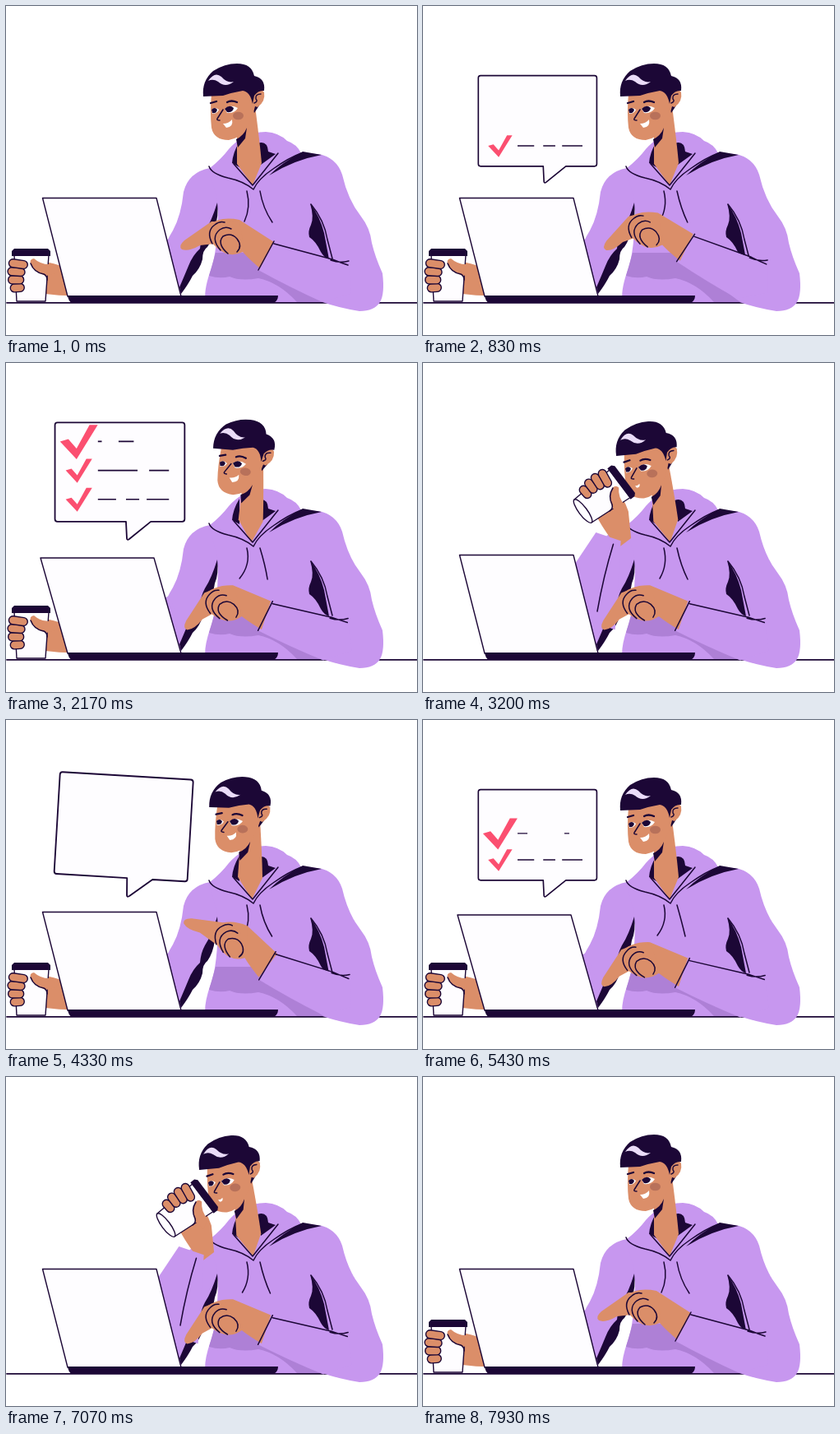
These frames come from a looping animation (500x400 px, 7.96 s). An HTML page:

```html
<!DOCTYPE html>
<html lang="en">
<head>
<meta charset="utf-8">
<title>Checklist at the laptop</title>
<style>
  html, body { margin: 0; width: 100%; height: 100%; overflow: hidden; background: #fff; }
  svg { display: block; width: 500px; height: 400px; }
  .ink { fill: #1c0736; }
  .skin { fill: #db8e69; }
  .cloth { fill: #c797ef; }
  .shade { fill: #ae80d6; }
  .paper { fill: #fefdff; stroke: #1c0736; stroke-width: 1.4; stroke-linejoin: round; }
  .line { fill: none; stroke: #1c0736; stroke-width: 1.5; stroke-linecap: round; stroke-linejoin: round; }
  .dash { fill: none; stroke: #1c0736; stroke-width: 1.6; }
  .finger { fill: #db8e69; stroke: #1c0736; stroke-width: 1.4; }
  .tick { fill: #fb4f70; }
</style>
</head>
<body>
<svg viewBox="0 0 500 400" xmlns="http://www.w3.org/2000/svg">
  <path class="line" style="stroke-width:1.8" d="M1 360.8H500"/>

  <g id="body">
    <path class="cloth" d="M264 190L248 197Q222 202 216 226Q213 255 203 273Q196 284 190 300L212 350Q240 310 258 245Z"/>
    <path class="cloth" d="M247 198Q262 186 271 174Q279 165 288 160Q301 153 316 153Q332 154 342 164Q354 168 359 179L380 180Q402 184 409 205Q416 236 432 256Q443 270 445 288Q449 305 458 325Q461 350 455 360Q448 371 430 371Q405 367 385 360H243Q240 348 248 324Q258 300 258 240Z"/>
    <path class="ink" d="M257 239Q259 256 254 268Q252 283 245 293Q239 297 239 308Q236 320 227 328Q222 338 213 350L211 342Q217 328 222 316Q227 303 236 295Q237 283 242 274Q250 262 257 239Z"/>
    <path class="ink" d="M320 206Q336 190 361 177L384 181Q350 187 320 206Z"/>
    <path class="ink" d="M370 240Q382 256 387 276L393 308Q387 306 383 299Q377 286 369 281Q367 274 371 266Q375 257 370 240Z"/>
    <path class="line" d="M371 241Q387 260 391 284L397 307"/>
    <path class="ink" d="M284 165Q276 178 275 191L284 196ZM306 167Q318 163 319 177L328 180L310 193Z"/>
  </g>

  <g id="head">
    <path class="skin" d="M281 150V192L300 218L311 191Q309 168 303 122L290 120Z"/>
    <path class="ink" d="M280 162Q289 158 293 148L291 161L282 172ZM299 121L308 121L302 130Z"/>
    <path class="skin" d="M250 106Q248 130 250 148Q253 163 271 163Q284 161 291 150Q299 140 303 122L300 98H252Z"/>
    <path class="skin" d="M300 104Q309 98 314 105Q316 116 306 123L300 121Z"/>
    <path class="ink" d="M240 110Q238 91 252 79Q266 70 281 70Q299 70 302 85Q316 88 314 103Q307 102 302 109L300 119Q297 104 288 103Q276 105 264 109Z"/>
    <path fill="#eadcf8" d="M246 91Q254 79 262 86Q269 94 277 92Q267 100 258 92Q252 88 246 91Z"/>
    <path class="line" d="M310 107Q303 107 304 113Q307 116 302 118"/>
    <path class="line" style="stroke-width:2.3" d="M249 118L256 116M269 117Q274 114 281 117"/>
    <path fill="#fff" d="M250 126Q254 122 259 126Q257 131 251 131ZM266 125Q273 119 282 124Q278 131 269 130Z"/>
    <path class="ink" d="M250 126Q254 122 257 126Q256 131 251 130ZM266 125Q272 119 277 124Q276 130 269 129Z"/>
    <path class="line" d="M264 126L257 137Q256 139 260 139"/>
    <ellipse cx="282.500" cy="133.500" rx="6.500" ry="4.800" fill="#b8715a"/>
    <path id="smile" fill="#fff" d="M-4-1Q3-1 7-6Q9 3 0 4Z"/>
  </g>

  <path class="line" d="M247 195Q250 204 270 209Q289 213 301 223Q307 210 325 198Q345 184 359 179M277 192L300 218L331 179"/>
  <path id="strings" class="line"/>

  <g id="cupArm">
    <path class="skin" d="M33 312Q46 309 64 315L92 332V352Q70 353 48 350L42 325Z"/>
    <path class="paper" d="M10 303L13 359H48L52 303Z"/>
    <ellipse id="cupBase" class="paper" cx="30.500" cy="359" rx="17.500"/>
    <path class="ink" d="M10 295H51L54 298V304H7V298Z"/>
    <path class="skin" d="M30 314Q28 308 34 307Q43 315 55 314L62 325L49 328Q35 324 30 314Z"/>
    <path class="line" d="M30 313Q34 324 46 326Q50 328 50 333"/>
    <g id="fingers"></g>
  </g>
  <path id="sleeve" class="cloth"/>
  <path id="sleeveLine" class="line"/>

  <path id="screen" class="paper"/>
  <path class="ink" d="M75 352H331Q331 358 326 361H80Q76 359 75 352Z"/>

  <path class="shade" d="M255 300L305 300L386 360H354Q332 336 307 331Q285 335 272 329Q260 332 247 328Z"/>
  <g id="arm">
    <path class="cloth" d="M326 287L307 321Q345 342 385 360L420 350L417 315Z"/>
    <g id="hand">
      <path class="skin" d="M246 267Q260 255 284 260L326 287L309 319Q296 308 288 299Q278 304 268 301Q254 295 250 285Z"/>
      <path id="index" class="skin" d="M250 262L217 285Q209 292 214 296Q222 299 236 291L262 288L268 262Z"/>
      <path class="skin" d="M250 288Q243 270 258 263L284 262L290 296Q278 304 266 300Z"/>
      <path class="line" d="M251 289Q243 274 254 266Q260 261 266 263M261 297Q248 282 260 272Q267 267 274 271M270 301Q256 289 264 280Q274 275 281 283Q288 292 281 299"/>
    </g>
    <path class="line" d="M307 321L326 286M326 289L397 308Q407 312 416 315M395 309Q406 313 417 310"/>
  </g>

  <g id="bubble">
    <path class="paper" style="stroke-width:1.8" d="M-86-142H65Q68-142 68-139V-25Q68-22 65-22H27L1-1Q-2 1-2-2L-3-22H-86Q-89-22-89-25V-139Q-89-142-86-142Z"/>
    <g id="rows"></g>
  </g>
</svg>

<script>
const LOOP = 7960, CYCLE = LOOP / 2;
const TAPS = [560, 1400, 2110];
const $ = id => document.getElementById(id);
const set = (id, name, value) => $(id).setAttribute(name, value);
const mix = (a, b, k) => a + (b - a) * k;
const clamp = x => Math.min(1, Math.max(0, x));

// Eased step, a step up and down again, and a round bump.
const ramp = (t, from, to) => (1 - Math.cos(Math.PI * clamp((t - from) / (to - from)))) / 2;
const hold = (t, a, b, c, d) => ramp(t, a, b) - ramp(t, c, d);
const bump = (t, mid, half) => ramp(Math.abs(t - mid), half, 0);

function add(parent, tag, attrs) {
  const el = document.createElementNS("http://www.w3.org/2000/svg", tag);
  for (const key in attrs) el.setAttribute(key, attrs[key]);
  return parent.appendChild(el);
}

// Each row is a tick followed by words, given as start and end.
const rows = [
  [[-37, -15], [-3, 13], [22, 49]],
  [[-37, 11], [25, 49]],
  [[-37, -22], [-12, 47]]
].map((words, i) => ({
  words,
  y: -49 - 35 * i,
  start: TAPS[i] - 90,
  tick: add($("rows"), "path", { class: "tick", d: "M-16 0L-9-2L-2 6L9-14H16L-2 15Z" }),
  line: add($("rows"), "path", { class: "dash" })
}));

for (let i = 3; i >= 0; i--)
  add($("fingers"), "rect", {
    class: "finger", x: 2 + (i - 1.2) ** 2, y: 308.5 + 9.7 * i,
    width: 23 - 2 * i, height: 10, rx: 5, transform: `rotate(${8 - 4 * i} 14 ${313 + 9.7 * i})`
  });

function drawBubble(t) {
  const size = 0.918 * ramp(t, 110, 330) + 0.3 * bump(t, 460, 190) + 0.155 * ramp(t, 2020, 2300);
  const scale = size * (1 - ramp(t, 2420, 2640));
  set("bubble", "visibility", scale > 0.01 ? "visible" : "hidden");
  set("bubble", "transform", `translate(149 215) rotate(${3.4 * bump(t, 360, 300)}) scale(${scale})`);
  for (const { y, start, words, tick, line } of rows) {
    const age = t - start, k = clamp((age - 70) / 260);
    const pop = ramp(age, 0, 90) * (1 + 0.43 * bump(age, 140, 200));
    tick.setAttribute("transform", `translate(-60 ${y}) scale(${pop})`);
    line.setAttribute("d", k ? words.map(([a, b]) => `M${a} ${y}H${mix(a, b, k)}`).join("") : "");
  }
}

function drawCupArm(t) {
  const k = hold(t, 2400, 2880, 3330, 3850);
  const turn = 53 * k * Math.PI / 180, cos = Math.cos(turn), sin = Math.sin(turn);
  const curve = (a, b, c) => mix(mix(a, b, k), mix(b, c, k), k);
  const x = curve(31, 90, 218), y = curve(330, 180, 163);
  set("cupArm", "transform", `translate(${x} ${y}) rotate(${53 * k}) translate(-31 -330)`);
  set("cupBase", "ry", 5 * k);

  // The sleeve runs from the elbow to the wrist, which turns with the cup.
  const reach = mix(58, 43, k), drop = mix(12, 23, k);
  const wrist = [x + reach * cos - drop * sin, y + reach * sin + drop * cos];
  const elbow = [mix(205, 192, k), mix(300, 310, k)];
  const dx = wrist[0] - elbow[0], dy = wrist[1] - elbow[1], length = Math.hypot(dx, dy);
  const side = (p, d) => `${p[0] - dy / length * d} ${p[1] + dx / length * d}`;
  const cuff = mix(8, 16, k), bend = mix(18, 44, k);
  set("sleeve", "d", `M${side(wrist, cuff)}L${side(wrist, -cuff)}L${side(elbow, -bend)}L${side(elbow, bend)}Z`);
  set("sleeveLine", "d", `M${wrist[0] + 6} ${wrist[1] + 9}Q${wrist[0] - 6} ${wrist[1] + 48} 212 302`);
  set("sleeveLine", "opacity", clamp((k - 0.7) / 0.25));
  set("smile", "transform", `translate(${268 - 5 * k} ${144 + 4 * k}) scale(${1 - 0.5 * k})`);
}

function drawHand(t) {
  const rest = hold(t, 420, 560, 3650, 3960);
  const raise = 2.4 * bump(t, 350, 220) + 7.7 * bump(t, 900, 320) + 7 * bump(t, 1740, 300) - 2 * rest;
  const point = bump(t, 350, 210) + 2 * bump(t, 1100, 330) + 2 * bump(t, 1760, 270) - rest;
  set("arm", "transform", `rotate(${raise} 430 335)`);
  set("hand", "transform", `rotate(${8 * point} 316 302)`);
  set("index", "transform", `rotate(${22 * point + 10 * point * point} 254 272)`);
}

function draw(t) {
  const head = 4.4 * bump(t, 400, 400) + 3 * bump(t, 1120, 280)
    + 7 * hold(t, 1600, 2150, 2450, 2850) - 3 * hold(t, 2500, 2900, 3300, 3850);
  set("head", "transform", `rotate(${head} 297 205)`);

  const press = TAPS.reduce((sum, tap) => sum + hold(t, tap - 80, tap, tap + 70, tap + 190), 0);
  set("screen", "d", `M${44.5 - 2.5 * press} ${233.5 + 3.5 * press}H${183 - 3 * press}L213 353H75Z`);

  const sway = 3 * Math.cos(t / CYCLE * Math.PI * 2);
  set("strings", "d", `M293 225Q298 245 ${287 + sway} 262M309 225Q${314 - sway / 2} 246 ${321 + sway} 263`);
  drawCupArm(t);
  drawHand(t);
  drawBubble(t);
}

const begin = performance.now();
function frame() {
  draw((performance.now() - begin) % LOOP % CYCLE);
  requestAnimationFrame(frame);
}
frame();
</script>
</body>
</html>
```
